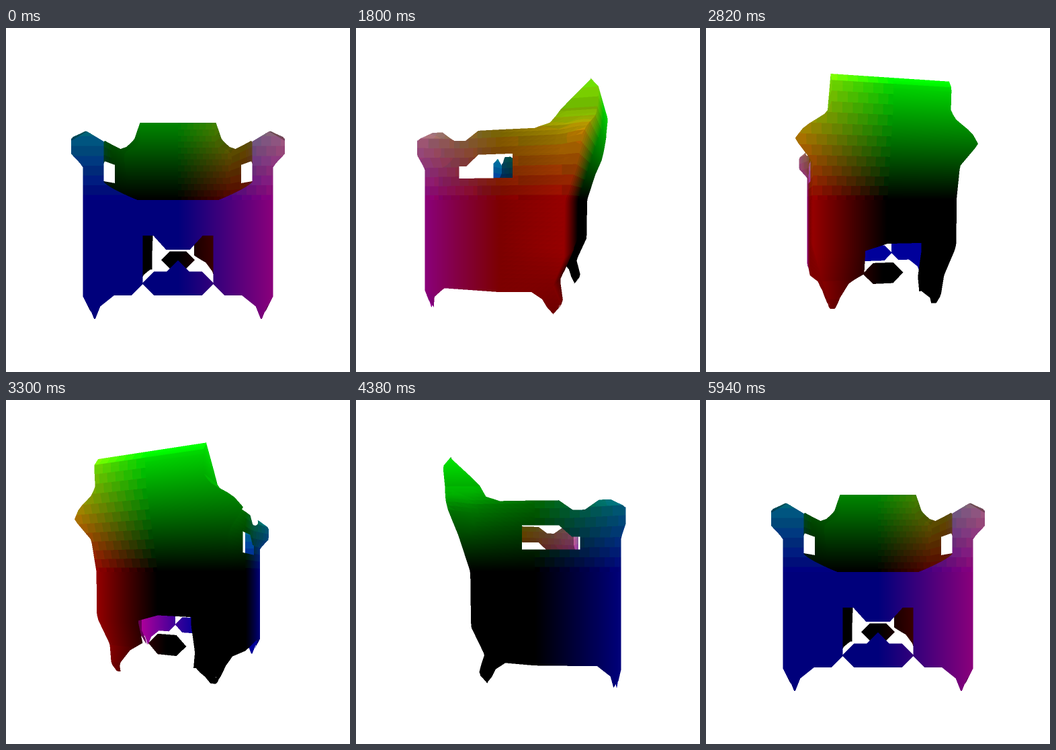
An HTML page with a canvas for the animation above (6000 ms loop, 512 by 512 pixels).

```html
<!DOCTYPE html>
<html>
<head>
<meta charset="utf-8">
<style>
html, body { margin: 0; width: 100%; height: 100%; overflow: hidden; background: #fff; }
canvas { display: block; width: 512px; height: 512px; }
</style>
</head>
<body>
<canvas id="stage" width="1024" height="1024"></canvas>
<script>
const SIZE = 1024, FOCAL = SIZE / 2 / Math.tan(Math.PI / 6), DISTANCE = 2.732;
const STEP_MS = 60, STEPS = 100;
const BOTTOM = -.85, TOP = .87, FRONT = .605, BAR_Z = -.27, CELL = .07;

const { abs, min, max, hypot, round } = Math;
const mix = (a, b, f) => a + (b - a) * f;
const clamp = v => min(1, max(0, v));

// Piecewise linear curve through [input, output] points
function curve(points, v) {
  const i = points.findIndex(p => v <= p[0]);
  if (i === 0) return points[0][1];
  if (i < 0) return points[points.length - 1][1];
  const [x0, y0] = points[i - 1], [x1, y1] = points[i];
  return mix(y0, y1, (v - x0) / (x1 - x0));
}

// Depth of the back corner at each height
const backProfile = [[-.85, -.345], [-.77, -.41], [-.62, -.36], [-.4, -.455], [0, -.46],
  [.43, -.6], [.6, -.66], [.8, -.68], [.87, -.62]];
const backZ = y => curve(backProfile, y);

// Half width of the chair at a given depth and height
function halfWidth(z, y) {
  const knob = .085 * clamp((y - .24) / .09) * clamp((.52 - y) / .06) * clamp((z - .3) / .3);
  const horn = .13 * max(0, 1 - hypot(z + .6, y - .42) / .17);
  const backLeg = .14 * clamp((-.35 - y) / .5) * clamp(-z / .35);
  const frontFoot = .08 * clamp((-.69 - y) / .16) * clamp(z / .6);
  const shoulder = min(.11, .8 * max(0, y - .5)) * clamp(-z / .35);
  return .61 + .113 * z + knob + horn - backLeg - frontFoot - shoulder;
}

// Trimming: each panel keeps only the points inside its outline
const foot = (d, width) => .08 * clamp(1.4 - abs(d) / .1) + .1 * max(0, 1 - abs(d) / width);
const hexagon = (x, y, radius) => abs(y) < .086 && abs(x) + abs(y) < radius;

function inFront(x, y) {
  const ax = abs(x);
  if (y > 0) return ax > .53 - .24 * clamp(1 - y / .13) ** 1.3 && y < .49 - .6 * abs(ax - .65);
  if (hexagon(ax, y + .596, .256) || (y > -.6 && ax < -.43 - y)) return true;
  if (ax < .252) return y > -.255 || y > -.355 + 1.1 * max(0, ax - .085);
  return y > max(-.68, -.348 - ax) - foot(ax - .595, .04);
}

const wing = [[-.63, .87], [-.48, .73], [-.4, .65], [-.35, .55], [-.25, .51]];

function inSide(x, y, z) {
  if (y < 0) return y > -.667 - foot(z - .58, .04) - foot(z + .35, .07);
  const ceiling = min(.333, max(.25, .333 - .9 * (z - .17)));
  if (z > -.09 && z < .32 && y > .16 && y < ceiling) return false;
  const notch = .07 * clamp(1.4 - abs(z - .31) / .1) + .07 * clamp((z - .53) / .07);
  return y < curve(wing, z) - notch;
}

function inBack(x, y) {
  if (x > -.27 && x < .17) return y > -.335 - .3 * max(0, x);
  const sole = x > 0 ? max(-.73, -.58 - .6 * (x - .17)) : -.73;
  return y > sole - foot(abs(x) - .43, .07);
}

const inBar = (x, y) => hexagon(x, y + .605, .17);

// A panel is a grid of triangles; place(f, y) gives the point at fraction f across
const triangles = [];

function addTriangle(inside, a, b, c) {
  const u = a.map((v, i) => b[i] - v), w = a.map((v, i) => c[i] - v);
  const n = [u[1] * w[2] - u[2] * w[1], u[2] * w[0] - u[0] * w[2], u[0] * w[1] - u[1] * w[0]];
  const outward = n[0] * a[0] + n[2] * a[2] < 0 ? -1 : 1;
  const length = hypot(...n) * outward;
  triangles.push({ inside, points: [a, b, c], normal: n.map(v => v / length) });
}

function panel(inside, place, rows = 54, columns = 24) {
  for (let j = 0; j < rows; j++) {
    const y0 = mix(BOTTOM, TOP, j / rows), y1 = mix(BOTTOM, TOP, (j + 1) / rows);
    for (let i = 0; i < columns; i++) {
      const f0 = i / columns, f1 = (i + 1) / columns;
      const b = place(f1, y0), c = place(f0, y1);
      addTriangle(inside, place(f0, y0), b, c);
      addTriangle(inside, b, place(f1, y1), c);
    }
  }
}

const across = zAt => (f, y) => [(2 * f - 1) * halfWidth(zAt(y), y), y, zAt(y)];

panel(inFront, across(() => FRONT));
panel(inBack, across(backZ));
panel(inBar, (f, y) => [mix(-.2, .2, f), y, BAR_Z], 8, 4);
for (const side of [-1, 1]) {
  panel(inSide, (f, y) => {
    const z = mix(backZ(y), FRONT, f);
    return [side * halfWidth(z, y), y, z];
  });
}

const context = document.getElementById('stage').getContext('2d');
const image = context.createImageData(SIZE, SIZE);
const pixels = new Uint32Array(image.data.buffer);
const nearness = new Float32Array(SIZE * SIZE);

// Colour follows position: x is red, y is green, z is blue.
// Above the seat, mixed colours break into staggered facets.
function colour(x, y, z, light) {
  if (y > 0 && (x > 0 || z > 0)) {
    const row = round(y / CELL), shift = (row & 1) / 2;
    const snap = v => (round(v / CELL + shift) - shift) * CELL;
    [x, y, z] = [snap(x), row * CELL, snap(z)];
  }
  const channel = v => min(255, max(0, v * 255 * light)) | 0;
  return 0xff000000 | channel(z) << 16 | channel(y) << 8 | channel(x);
}

function fillTriangle({ inside, points: [a, b, c], normal }, cos, sin) {
  const [p, q, r] = [a, b, c].map(([x, y, z]) => {
    const w = 1 / (DISTANCE - x * sin - z * cos);
    return { x: SIZE / 2 + FOCAL * (x * cos - z * sin) * w, y: SIZE / 2 - FOCAL * y * w, w };
  });
  const area = (q.x - p.x) * (r.y - p.y) - (q.y - p.y) * (r.x - p.x);
  if (abs(area) < 1e-6) return;
  const [nx, ny, nz] = normal;
  const outside = nx * (DISTANCE * sin - a[0]) - ny * a[1] + nz * (DISTANCE * cos - a[2]) > 0;
  const light = outside
    ? .8 + .25 * clamp(-a[2] / .45) + .2 * max(0, ny)
    : .6 + .4 * max(0, nz);
  const left = Math.ceil(min(p.x, q.x, r.x) - .5), right = max(p.x, q.x, r.x) - .5;
  const top = Math.ceil(min(p.y, q.y, r.y) - .5), bottom = max(p.y, q.y, r.y) - .5;
  for (let py = top; py <= bottom; py++) {
    for (let px = left; px <= right; px++) {
      const dx = px + .5 - p.x, dy = py + .5 - p.y;
      const fq = (dx * (r.y - p.y) - dy * (r.x - p.x)) / area;
      const fr = (dy * (q.x - p.x) - dx * (q.y - p.y)) / area;
      const fp = 1 - fq - fr;
      if (min(fp, fq, fr) < -1e-6) continue;
      const w = fp * p.w + fq * q.w + fr * r.w, at = py * SIZE + px;
      if (w <= nearness[at]) continue;
      const wp = fp * p.w / w, wq = fq * q.w / w, wr = fr * r.w / w;
      const x = a[0] * wp + b[0] * wq + c[0] * wr;
      const y = a[1] * wp + b[1] * wq + c[1] * wr;
      const z = a[2] * wp + b[2] * wq + c[2] * wr;
      if (!inside(x, y, z)) continue;
      nearness[at] = w;
      pixels[at] = colour(x, y, z, light);
    }
  }
}

let shown = -1;
function draw(now) {
  requestAnimationFrame(draw);
  const step = Math.floor(now / STEP_MS) % STEPS;
  if (step === shown) return;
  shown = step;
  // First and last steps share the same pose
  const angle = step / (STEPS - 1) * 2 * Math.PI;
  const cos = Math.cos(angle), sin = Math.sin(angle);
  pixels.fill(0xffffffff);
  nearness.fill(0);
  for (const triangle of triangles) fillTriangle(triangle, cos, sin);
  context.putImageData(image, 0, 0);
}
requestAnimationFrame(draw);
</script>
</body>
</html>
```
